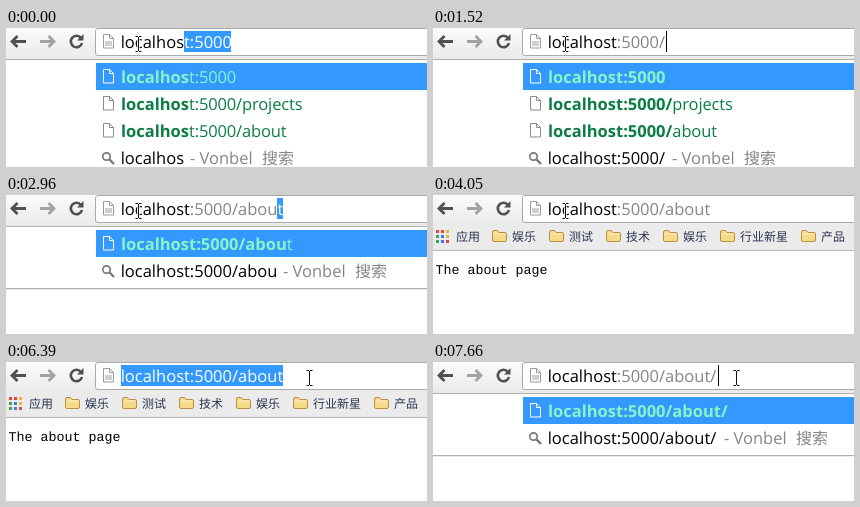
An HTML page for the animation above (8 s loop, 421 by 139 pixels).

```html
<!DOCTYPE html>
<html lang="zh">
<head>
<meta charset="utf-8">
<title>Address bar</title>
<style>
html, body { margin: 0; width: 100%; height: 100%; overflow: hidden; background: #fff; }
svg { display: block; }
text { font-family: "Open Sans", "Noto Sans CJK SC", "Noto Sans CJK", sans-serif; font-size: 16.5px; text-rendering: geometricPrecision; }
rect { shape-rendering: crispEdges; }
.b { font-weight: 700; }
.r { letter-spacing: -.14px; }
.mark { font: 12px "Noto Sans CJK SC", "Noto Sans CJK", sans-serif; fill: #2b3350; }
.cjk { font: 16px "Noto Sans CJK SC", "Noto Sans CJK", sans-serif; }
.body { font: 13.34px "Liberation Mono", monospace; fill: #000; }
</style>
</head>
<body>
<svg width="421" height="139" viewBox="0 0 421 139">
  <defs>
    <linearGradient id="bar" x1="0" y1="0" x2="0" y2="1">
      <stop offset="0" stop-color="#fbfbfb"/><stop offset="1" stop-color="#eaeaea"/>
    </linearGradient>
    <path id="doc" d="M.5 .5h6l4 4v9.500h-10zM6.500 .5v4h4" stroke-linejoin="round"/>
    <g id="folder">
      <path d="M.5 2.500q0-1.500 1.500-1.500h3.500l1.500 2h6q1.500 0 1.500 1.500v6q0 1.500-1.500 1.500h-11q-1.500 0-1.500-1.500z" fill="#f7d98a" stroke="#b98f45"/>
      <path d="M1.500 4.500h12" stroke="#fdf0c4"/>
    </g>
    <path id="beam" d="M-3 -7.500h2.500M.5 -7.500h2.500M0 -7v14M-3 7.500h2.500M.5 7.500h2.500"/>
  </defs>
  <rect width="421" height="139" fill="#fff"/>
  <rect width="421" height="31" fill="url(#bar)"/>

  <g fill="none" stroke-width="2.800">
    <path d="M6 13.500h14M11.500 8L6 13.500l5.500 5.500" stroke="#505050"/>
    <path d="M34 13.500h14M42.500 8L48 13.500l-5.500 5.500" stroke="#a2a2a2"/>
    <path d="M75 10A5.700 5.700 0 1 0 76 15" stroke="#505050" stroke-width="2.600"/>
  </g>
  <path d="M77.500 6v6.500h-6.500z" fill="#505050"/>
  <path d="M422 .5H92q-2.500 0-2.500 2.500v22q0 2.500 2.500 2.500h330" fill="#fff" stroke="#a9a9a9"/>
  <use href="#doc" x="97" y="6" fill="#fff" stroke="#9a9a9a"/>
  <rect x="99" y="13" width="7" height="5" fill="#d0d0d0"/>

  <rect id="sel" y="3" height="21" fill="#3399ff"/>
  <text id="url" x="114.700" y="20"></text>
  <rect id="caret" y="3" width="1" height="21"/>

  <g id="page">
    <rect y="31" width="421" height="24" fill="#ebebeb"/>
    <rect y="55" width="421" height="1" fill="#b4b4b4"/>
    <g id="marks"></g>
    <text class="body" x="2.500" y="78.500">The about page</text>
  </g>

  <g id="list">
    <rect y="31" width="421" height="108" fill="#fff"/>
    <rect y="31" width="421" height="1" fill="#b0b0b0"/>
    <rect x="90" y="35" width="331" height="27" fill="#3399ff"/>
    <use href="#doc" x="97" y="41" fill="none" stroke="#fff"/>
    <text id="top" x="115" y="55" fill="#86f5c6"></text>
    <g id="more">
      <g fill="none" stroke="#8c8c8c">
        <use href="#doc" x="97" y="68"/><use href="#doc" x="97" y="95"/>
      </g>
      <text id="row2" x="115" y="82" fill="#0c7d45"></text>
      <text id="row3" x="115" y="109" fill="#0c7d45"></text>
    </g>
    <g id="search">
      <g fill="none" stroke="#777">
        <circle cx="100.500" cy="74.500" r="3.700" stroke-width="1.700"/>
        <path d="M103.500 77.500l4.500 4.500" stroke-width="2.400"/>
      </g>
      <text id="query" x="114.700" y="82"></text>
      <g id="tail" fill="#858585">
        <text x="6" y="82">-</text>
        <text x="15.500" y="82">Vonbel</text>
        <text class="cjk" x="78" y="82">搜索</text>
      </g>
    </g>
    <g id="edge">
      <rect y="93" width="421" height="1" fill="#b0b0b0"/>
      <rect y="94" width="421" height="1" fill="#ececec"/>
    </g>
  </g>

  <g id="mouse" fill="none">
    <use href="#beam" stroke="#fff" stroke-width="3" stroke-opacity=".75"/>
    <use href="#beam" stroke="#111"/>
  </g>
</svg>
<script>
const LOOP = 8000;
const HOST = 'localhost', BASE = HOST + ':5000', ABOUT = BASE + '/about';
const $ = id => document.getElementById(id);

// time, typed part, completed part
const typing = [
  [0, 'localhos', 't:5000'],
  [150, HOST, ':5000'],
  [710, BASE, ''],
  [1520, BASE + '/', ''],
  [2390, BASE + '/a', 'bout'],
  [2660, BASE + '/ab', 'out'],
  [2810, BASE + '/abo', 'ut'],
  [2960, BASE + '/abou', 't'],
  [3240, ABOUT, ''],
  [7660, ABOUT + '/', '']
];
const carets = [[710, 1270], [1520, 2080], [3240, 3770], [6670, 7230], [7660, LOOP]];
// time, x, y of the pointer; no x means hidden
const pointer = [
  [0, 132.5, 16], [5480], [5760, 271.5, 23], [5880, 289.5, 19],
  [6030, 297.5, 17], [6150, 301.5, 16], [6270, 303.5, 16]
];
// x after a given number of typed letters
const stops = { 8: 178, 9: 184, 14: 226, 15: 233, 16: 241, 17: 251, 18: 261, 19: 271, 20: 278, 21: 285 };

const at = (list, t) => list.filter(s => s[0] <= t).pop();
const within = (t, a, b) => t >= a && t < b;
const show = (id, on) => $(id).setAttribute('display', on ? 'inline' : 'none');
const span = (s, attrs) => s ? `<tspan ${attrs}>${s}</tspan>` : '';

function put(id, html) {
  const el = $(id);
  if (el.shown !== html) el.innerHTML = el.shown = html;
}

function match(id, url, n) {
  put(id, span(url.slice(0, n), 'class="b"') + span(url.slice(n), 'class="r"'));
}

function buildMarks() {
  const dots = ['#e2473c', '#e2473c', '#f0b429', '#3aa757', '#3b7ded', '#f0b429', '#3aa757', '#3b7ded', '#e2473c'];
  let html = dots.map((c, i) =>
    `<rect x="${3 + i % 3 * 5}" y="${35 + Math.floor(i / 3) * 5}" width="3" height="3" fill="${c}"/>`).join('');
  html += '<text class="mark" x="23" y="46">应用</text>';
  const names = [[59, '娱乐'], [116, '测试'], [173, '技术'], [230, '娱乐'], [287, '行业新星'], [368, '产品']];
  for (const [x, s] of names)
    html += `<use href="#folder" x="${x}" y="34.5"/><text class="mark" x="${x + 20}" y="46">${s}</text>`;
  $('marks').innerHTML = html;
}

function drawUrl(t, typed, rest) {
  const n = typed.length, all = within(t, 6390, 6670);
  const end = stops[n < 15 ? 14 : 20] - 1;
  const from = all ? 115 : stops[n];
  show('sel', all || rest);
  $('sel').setAttribute('x', from);
  $('sel').setAttribute('width', Math.max(0, end - from));
  put('url', all ? span(typed, 'fill="#fff"') :
    span(typed.slice(0, 9), 'fill="#000"') +
    span(typed.slice(9), 'fill="#858585"') +
    span(rest, 'fill="#fff"'));
  show('caret', carets.some(c => within(t, ...c)));
  $('caret').setAttribute('x', stops[n]);
}

function drawList(t, typed, rest) {
  const n = typed.length, long = t < 2390;
  match('top', long ? BASE : typed + rest, n);
  match('row2', BASE + '/projects', n);
  match('row3', BASE + '/about', n);
  show('more', long);
  show('edge', t >= 2510);
  $('search').setAttribute('transform', `translate(0 ${long ? 54 : 0})`);
  put('query', typed);
  $('tail').setAttribute('transform', `translate(${stops[n]} 0)`);
}

function draw(t) {
  const [, typed, rest] = at(typing, t);
  const loaded = within(t, 4050, 7660);
  show('page', loaded);
  show('list', !loaded);
  drawUrl(t, typed, rest);
  drawList(t, typed, rest);
  const [, x, y] = at(pointer, t);
  show('mouse', x);
  if (x) $('mouse').setAttribute('transform', `translate(${x} ${y})`);
}

function frame() {
  draw(performance.now() % LOOP);
  requestAnimationFrame(frame);
}

buildMarks();
draw(0);
requestAnimationFrame(frame);
</script>
</body>
</html>
```
